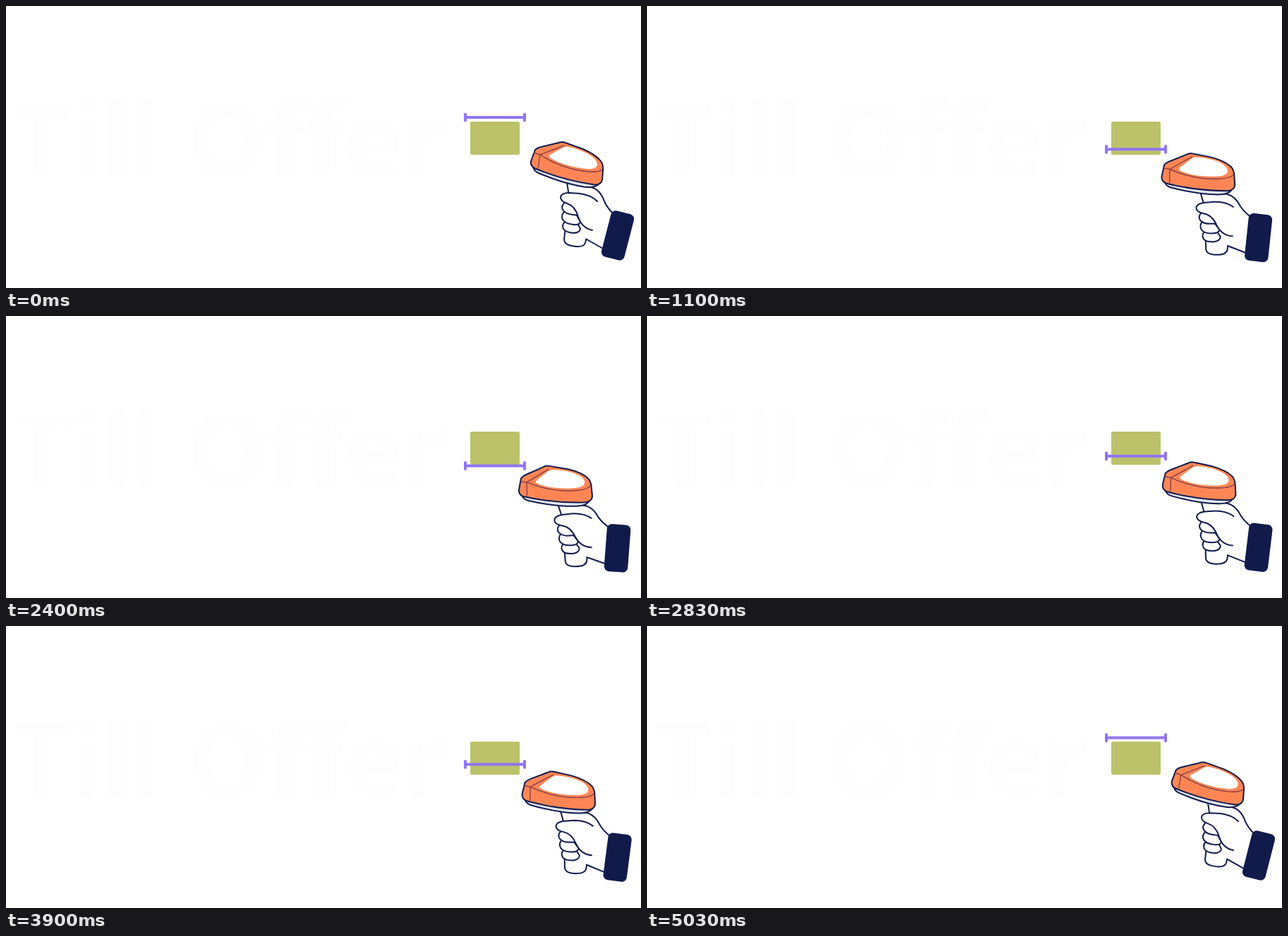
Recreate the animation shown at these times as an HTML page. Size 900 by 400 pixels, loop 5.11 s.

```html
<!DOCTYPE html>
<html lang="en">
<head>
<meta charset="utf-8">
<title>Till Offer</title>
<style>
  html, body { margin: 0; width: 100%; height: 100%; overflow: hidden; background: #fff; }
  svg { display: block; }
  text { font: 700 141px "Open Sans", sans-serif; fill: #fdfdfd; }
  .ink { fill: #fff; stroke: #111b4d; stroke-width: 2; stroke-linejoin: round; stroke-linecap: round; }
  .bare { fill: none; }
  .plate { fill: #e3e5f1; }
  .orange { fill: #ff8654; }
  .fold { fill: none; stroke: #8b3d48; stroke-width: 1.4; }
</style>
</head>
<body>
<svg width="900" height="400" viewBox="0 0 900 400">
  <text x="10" y="241">Till Offer</text>
  <rect x="658" y="164" width="70" height="47" rx="2" fill="#bcc26a"/>
  <path id="beam" d="M651 0H735M651 -4.5V4.5M735 -4.5V4.5" fill="none" stroke="#9075f2" stroke-width="4" stroke-linecap="round"/>

  <g id="hand">
    <!-- grip and palm -->
    <path class="ink" d="M795 250L798 270L791 331Q791 338 801 340Q818 344 821 336L826 316L831 266L829 252Z"/>
    <path fill="#fff" d="M829 257Q842 260 849 279L860 294L846 344L823 331L812 310L810 270Z"/>
    <path class="ink bare" d="M829 257Q842 260 848 277Q852 286 860 294M823 331L846 344"/>
    <!-- fingers -->
    <path class="ink" d="M794 305Q787 309 790 316Q793 321 804 322Q813 322 814 316L810 308Z"/>
    <path class="ink" d="M792 291Q786 296 789 303Q793 309 804 310Q813 311 814 306L808 295Z"/>
    <path class="ink" d="M793 278Q786 283 789 289Q793 295 803 296L811 297L804 282Z"/>
    <!-- thumb -->
    <path fill="#fff" d="M786 271Q787 265 798 265L813 265Q829 268 838 277L833 318Q817 314 811 299Q807 284 795 280Q786 277 786 271Z"/>
    <path class="ink bare" d="M838 277Q829 268 813 266L798 265Q787 265 786 271Q786 277 795 280Q807 284 811 299Q816 315 831 318"/>
    <!-- scanner head -->
    <path class="ink plate" d="M747 228Q748 234 755 237Q790 252 819 256.5Q838 259 841 250Z"/>
    <path class="ink orange" d="M750 204Q753 201 758 200L783 194Q788 192 793 194L818 203Q836 211 843 220Q847 225 846 234L845 247Q843 254 834 253.5Q789 247 749 230Q743 227 744 220Z"/>
    <path d="M771 211Q768 214 774 217Q793 228 823 231Q837 232 838 225Q838 219 830 213Q817 204 798 200Q793 199 789 201Z" fill="#fff"/>
    <path class="fold" d="M748 208L757 211Q790 232 827 235Q840 236 845 232M757 211L791 198M757 211L754 230"/>
    <!-- cuff -->
    <rect x="850.2" y="291.8" width="33.6" height="67.4" rx="7" fill="#101b4c" transform="rotate(14.5 867 325.5)"/>
  </g>
</svg>
<script>
  const [beam, hand] = ["beam", "hand"].map(id => document.getElementById(id));
  const LOOP = 5110, CYCLE = 34, DOWN = 16.6;

  // Two steps per 100 ms, at 0 and 30; the last one holds until the loop ends.
  const stepAt = t => Math.min(101, 2 * Math.floor(t / 100) + (t % 100 >= 30));

  function draw() {
    const phase = stepAt(performance.now() % LOOP) % CYCLE;
    const turn = phase < DOWN ? phase / DOWN : 1 + (phase - DOWN) / (CYCLE - DOWN);
    const k = (1 - Math.cos(Math.PI * turn)) / 2;
    beam.setAttribute("transform", `translate(0 ${158 + 58 * k})`);
    hand.setAttribute("transform", `rotate(${-10.8 * k} 888 330)`);
    requestAnimationFrame(draw);
  }
  draw();
</script>
</body>
</html>
```
